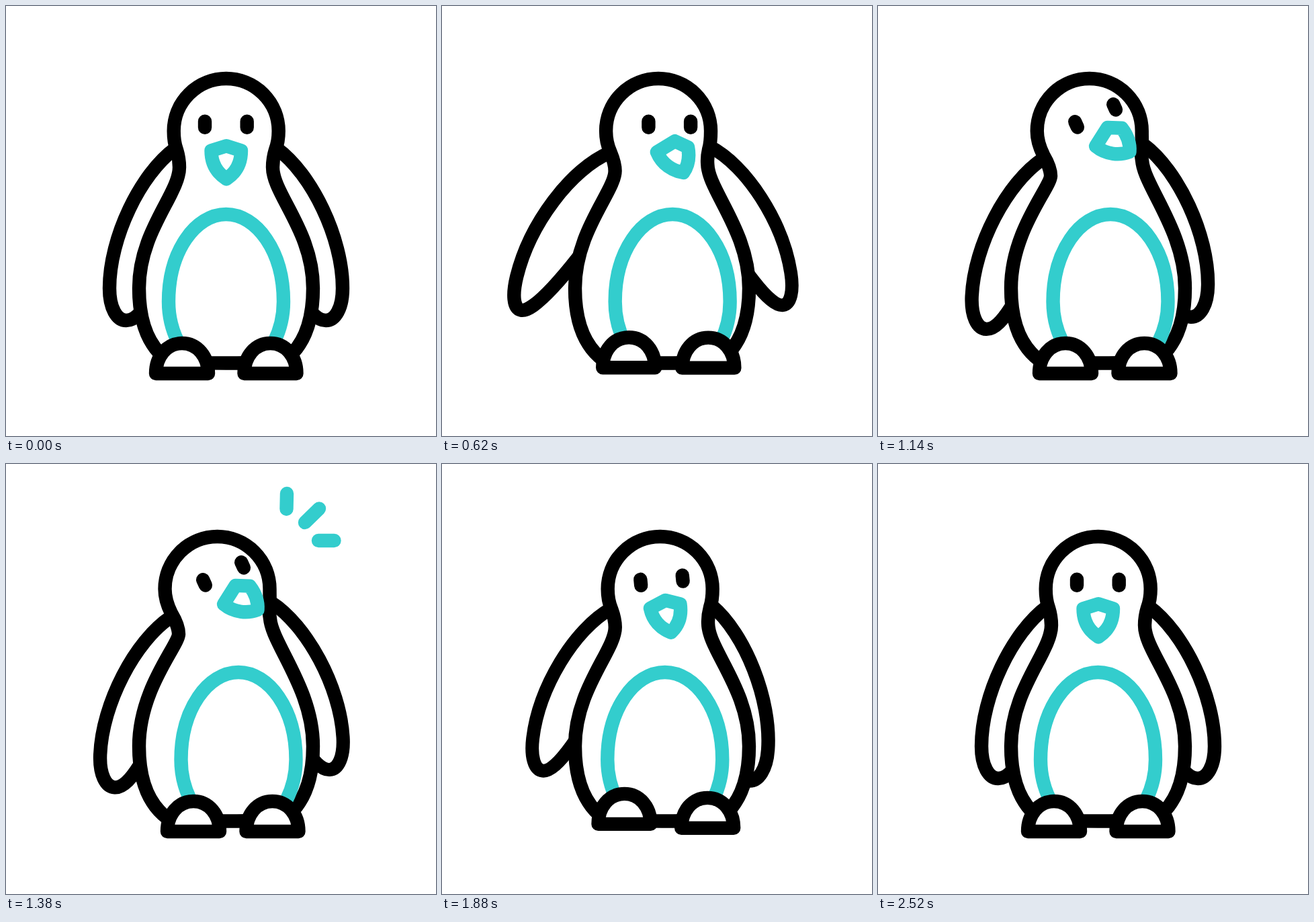
These frames come from a looping animation (640 by 640 pixels, 2700 ms). An HTML page:

```html
<!DOCTYPE html>
<html lang="en">
<head>
<meta charset="utf-8">
<title>Penguin</title>
<style>
  html, body { margin: 0; width: 100%; height: 100%; overflow: hidden; background: #fff; }
  svg { display: block; width: 100%; height: 100%; }
  path { fill: #fff; stroke: #000; stroke-width: 20.4; stroke-linecap: round; stroke-linejoin: round; }
  .accent { stroke: #33cdcd; }
</style>
</head>
<body>
<svg viewBox="0 0 640 640">
  <defs><path id="foot" d="M-39 0C-39-25-23-45 0-45S39-25 39 0Z"/></defs>
  <path id="wingL"/>
  <path id="wingR"/>
  <path id="body"/>
  <path id="belly" class="accent" d="M256 500C246 480 242 462 242 440C242 365 282 310 327.5 310S413 365 413 440C413 462 409 480 399 500"/>
  <g id="face">
    <path d="M0-4.5V4.5M62.7-4.5V4.5"/>
    <path id="beak" class="accent"/>
  </g>
  <use id="footL" href="#foot"/>
  <use id="footR" href="#foot"/>
  <path id="rays" class="accent"/>
</svg>
<script>
const LOOP = 2700;
const $ = id => document.getElementById(id);
const span = (t, from, to) => Math.min(1, Math.max(0, (t - from) / (to - from)));
const lerp = (a, b, k) => a + (b - a) * k;

function ease(t, from, to) {
  const x = span(t, from, to);
  return x * x * (3 - 2 * x);
}

// Value at time t from [time, value] pairs, eased between each two
function keyed(t, keys) {
  let value = keys[0][1];
  for (let i = 1; i < keys.length; i++)
    value += (keys[i][1] - keys[i - 1][1]) * ease(t, keys[i - 1][0], keys[i][0]);
  return value;
}

// Blend two paths that share the same commands
function morph([a, b], k) {
  const ends = b.match(/-?[\d.]+/g);
  let i = 0;
  return a.replace(/-?[\d.]+/g, n => " " + lerp(+n, +ends[i++], k));
}

// Upright and leaning sides and head; the lower body is the same for both
const BODY = [
  "M198 420C198 335 258 280 258 240C258 235 258 227 254 214C251 206 249.7 198 249.7 186" +
  "A78 78 0 0 1 405.7 186C405.7 198 404 206 401 214C397 227 397 235 397 240C397 280 457 335 457 420",
  "M198 420C198 335 257 270 257 253C257 245 252 232 246 222C240 210 236.5 198 236.5 186" +
  "A78 78 0 0 1 392.5 186C392.5 198 393 206 392 212C391.5 220 392 225 393 230C396 268 457 335 457 420"
];
const LOWER_BODY = "C457 470 443 506 415 527C390 533 265 533 240 527C212 506 198 470 198 420Z";

// Facing forward and turned aside
const BEAK = [
  "M9.5 39L32 32L54 39C54 58 46 72 32 81C18 72 9.5 58 9.5 39Z",
  "M13 41.5L40.5 23.5L59.5 33C63 48 61 60 55.5 70C40 69 22 60 13 41.5Z"
];

// At rest and spread, around the shoulder
const WING = [
  "M-6-8C-58 30-104 125-104 200C-104 230-93 248-79 248C-53 248-28 190 12 90L30 0Z",
  "M-6-8C-58 30-98 125-98 205C-98 232-92 252-80 252C-62 252-28 190 12 90L30 0Z"
];

const RAYS = [[417.5, 67, 418, 44], [445, 87, 466, 66.5], [465, 114, 488.5, 114]];

const LEFT_ANGLE = [[120, 0], [366, 17], [1200, 2.3], [1440, 2.3], [1860, 7], [2260, 0]];
const LEFT_SIZE = [[1440, 1], [1860, .975], [2260, 1]];
const RIGHT_ANGLE = [[120, 0], [380, 13.2], [1050, -1.3], [1430, 3.6], [1860, -4], [2270, 2.4], [2520, 0]];

// Three quick steps, lifting the foot each time
function lift(t, start) {
  const x = (t - start) / 180;
  return x > 0 && x < 3 ? -12.7 * Math.abs(Math.sin(Math.PI * x)) : 0;
}
const stride = (t, start) => 1 - (1 - span(t, start, start + 640)) ** 2;

function place(id, x, y, extra = "") {
  $(id).setAttribute("transform", `translate(${x} ${y}) ${extra}`);
}

function shape(id, d) {
  $(id).setAttribute("d", d);
}

function wing(id, x, y, side, angle, size) {
  shape(id, morph(WING, span(angle, 0, 12)));
  place(id, x, y, `scale(${side * size} ${size}) rotate(${angle})`);
}

function draw(t) {
  const back = 1 - ease(t, 1430, 2085);
  const turn = ease(t, 110, 790) * back;
  const lean = ease(t, 120, 1230) * back;
  const tilt = ease(t, 620, 1155) * back;

  shape("body", morph(BODY, lean) + LOWER_BODY);
  shape("beak", morph(BEAK, turn));
  place("belly", 18.5 * turn, 0);
  place("face", 296 + 13.5 * turn - 14.5 * tilt, 176.3, `rotate(${-24.5 * tilt})`);

  const right = keyed(t, RIGHT_ANGLE);
  wing("wingL", 258 - 7 * lean, 220 + 16 * lean, 1, keyed(t, LEFT_ANGLE), keyed(t, LEFT_SIZE));
  wing("wingR", 397 - 8 * lean, 220 - 6 * lean, -1, right, 1 - .0037 * Math.max(0, right));

  const step = stride(t, 120) - stride(t, 1720);
  place("footL", 262 + 17 * step, 547 + lift(t, 125) + lift(t, 1820));
  place("footR", 393.5 + 3 * step, 547 + lift(t, 220) + lift(t, 1725));

  const head = ease(t, 1200, 1370), tail = ease(t, 1480, 1700);
  shape("rays", head > tail ? RAYS.map(([x, y, x2, y2]) =>
    `M${lerp(x, x2, tail)} ${lerp(y, y2, tail)}L${lerp(x, x2, head)} ${lerp(y, y2, head)}`).join("") : "");
}

const begin = performance.now();
function frame() {
  draw((performance.now() - begin) % LOOP);
  requestAnimationFrame(frame);
}
frame();
</script>
</body>
</html>
```
